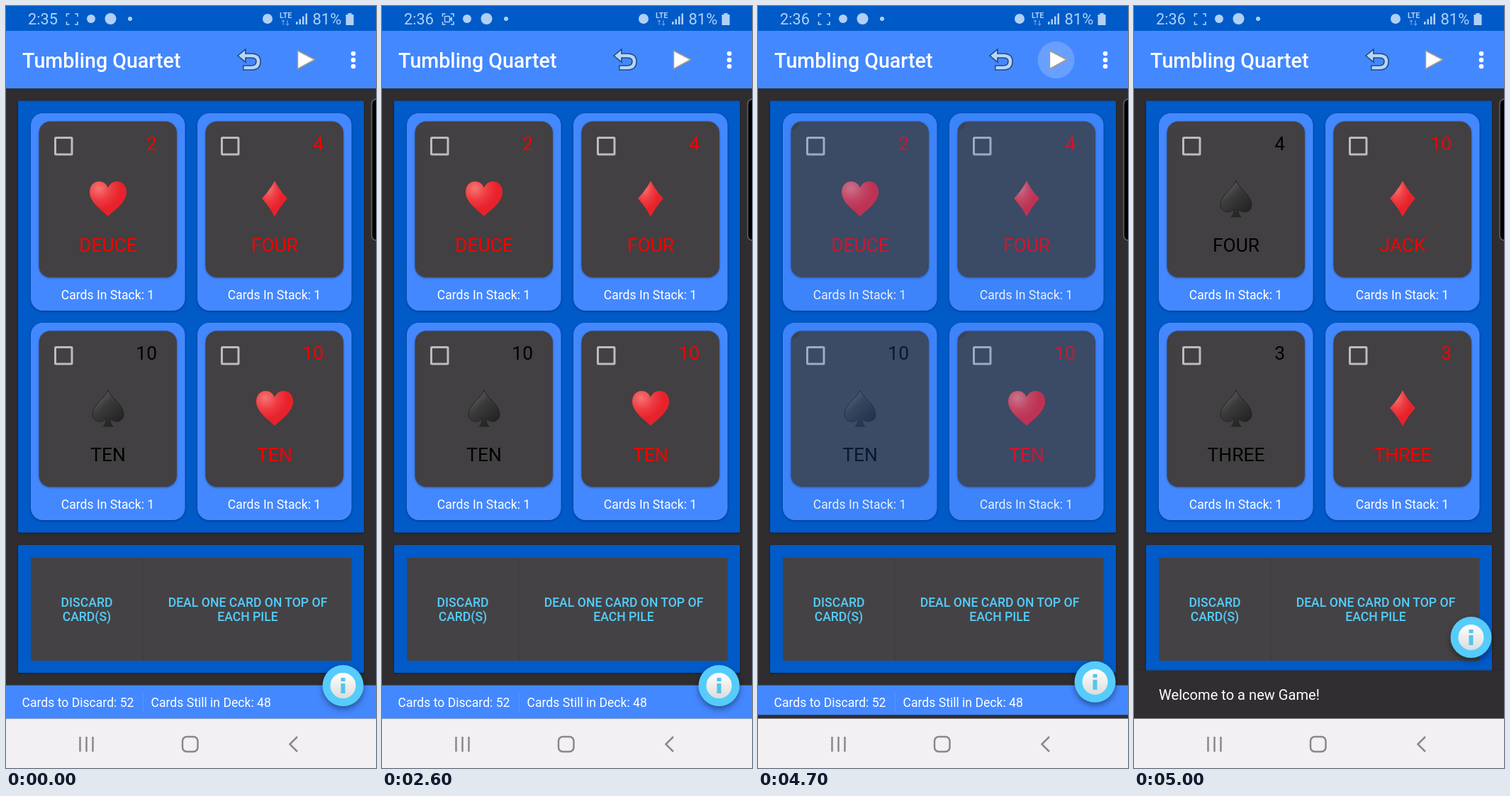
Animation of 522 by 1073 pixels, one loop 5.2 s. Source, as an HTML page:

```html
<!DOCTYPE html>
<html lang="en">
<head>
<meta charset="utf-8">
<title>Card game</title>
<style>
  html, body { margin: 0; width: 100%; height: 100%; overflow: hidden; background: #2f2d2f; }
  svg { display: block; width: 522px; height: 1073px; font-family: Roboto, sans-serif; font-size: 17.6px; }
  .mid { text-anchor: middle; }
  .big { font-size: 26.4px; }
  .shade { filter: drop-shadow(0 1px 1.5px #0006); }
  .button { font-weight: 500; fill: #55ccfb; text-anchor: middle; }
</style>
</head>
<body>
<svg viewBox="0 0 522 1073">
  <defs>
    <radialGradient id="red" cx=".25" cy=".2" r=".6">
      <stop offset="0" stop-color="#f77474"/><stop offset=".55" stop-color="#ee3c42"/><stop offset="1" stop-color="#e8222b"/>
    </radialGradient>
    <linearGradient id="black" x2=".8" y2="1">
      <stop offset="0" stop-color="#747474"/><stop offset=".45" stop-color="#3b3b3b"/><stop offset="1" stop-color="#202020"/>
    </linearGradient>
    <linearGradient id="pearl" x2="0" y2="1">
      <stop offset="0" stop-color="#fff"/><stop offset="1" stop-color="#dcdcdc"/>
    </linearGradient>
    <path id="heart" fill="url(#red)" d="M0 25C-7 18-26 6-26-9C-26-19-19-24-13-24C-6-24-2-20 0-15C2-20 6-24 13-24C19-24 26-19 26-9C26 6 7 18 0 25Z"/>
    <path id="diamond" fill="url(#red)" d="M0-25Q7-11 18 0Q7 12 0 26Q-7 12-18 0Q-7-11 0-25Z"/>
    <path id="spade" fill="url(#black)" stroke="#222" d="M0-25C3-15 22-5 22 9C22 20 9 22 3 15Q3 23 7 26H-7Q-3 23-3 15C-9 22-22 20-22 9C-22-5-3-15 0-25Z"/>
    <clipPath id="reveal"><circle id="hole" cx="11" cy="11" r="0"/></clipPath>
  </defs>

  <rect width="522" height="1073" fill="#2f2d2f"/>

  <!-- status bar -->
  <rect width="522" height="35" fill="#005ac8"/>
  <g fill="#b0d0f6">
    <text id="clock" x="31" y="25.7" font-size="21.7"></text>
    <path d="M89.500 11H85.500V15M97 11H101V15M85.500 22V26H89.500M101 22V26H97" fill="none" stroke="#b0d0f6" stroke-width="1.600"/>
    <g id="camera"><rect x="88.500" y="14.500" width="7" height="8" rx="1" fill="none" stroke="#b0d0f6" stroke-width="1.500"/><path d="M95 18.500L99 15V22Z"/></g>
    <circle cx="120" cy="18" r="6"/>
    <circle cx="147.500" cy="18" r="8"/>
    <circle cx="175" cy="18" r="3"/>
    <circle cx="369" cy="18" r="7"/>
    <text x="386" y="16.500" font-size="10.500" font-weight="700">LTE</text>
    <path d="M391 27V20M389 22L391 20L393 22M397 20V27M395 25L397 27L399 25" fill="none" stroke="#5d98df" stroke-width="1.400"/>
    <path d="M409 22h2.500v4h-2.500zM413.500 18.500h2.500v7.500h-2.500zM418 14.500h2.500v11.500h-2.500zM422.500 10.500h2.500v15.500h-2.500z"/>
    <text x="432.500" y="25.700" font-size="22">81%</text>
    <path d="M482.500 10h5v2h3v15h-11v-15h3z"/>
  </g>

  <!-- app bar -->
  <rect y="35" width="522" height="81" fill="#4488ff"/>
  <text x="23" y="86.500" font-size="28.600" font-weight="500" fill="#fff">Tumbling Quartet</text>
  <g fill="none">
    <path d="M335 70H346Q356 70 356 78Q356 87 346 87H334" stroke="#24477f" stroke-width="7.500"/>
    <path d="M327 70L338 61V79Z" fill="#b5d7f8" stroke="#24477f" stroke-width="1.600"/>
    <path d="M334.500 70H346Q356 70 356 78Q356 87 346 87H335.500" stroke="#b5d7f8" stroke-width="4.500"/>
  </g>
  <circle id="ripple" cx="420.500" cy="76" r="26" fill="#fff"/>
  <path d="M411.500 63L435.500 75.500L411.500 88.500Z" fill="#fff" stroke="#a39a8c" stroke-width="1.500" stroke-linejoin="round"/>
  <g fill="#fff"><circle cx="490" cy="67" r="3.300"/><circle cx="490" cy="76" r="3.300"/><circle cx="490" cy="85" r="3.300"/></g>

  <path d="M523 131Q516 131 516 139V322Q516 330 523 330" fill="#000" stroke="#777577" stroke-width="1.200"/>

  <rect class="shade" x="17" y="133.500" width="488" height="608" rx="2" fill="#005ac8"/>
  <g id="stacks"></g>

  <rect class="shade" x="17" y="759" width="488" height="180" rx="2" fill="#005ac8"/>
  <rect x="35" y="777" width="452.500" height="145" fill="#444244"/>
  <path d="M193.500 777V922" stroke="#3d3b3d"/>
  <g class="button">
    <text x="114" y="846.200">DISCARD</text><text x="114" y="866.400">CARD(S)</text>
    <text x="341" y="846.200">DEAL ONE CARD ON TOP OF</text><text x="341" y="866.400">EACH PILE</text>
  </g>

  <!-- footer and message -->
  <rect y="956.500" width="522" height="47" fill="#4488ff"/>
  <path d="M193.500 967V994" stroke="#5b94f5"/>
  <g fill="#fff"><text x="22.500" y="987.300">Cards to Discard: 52</text><text x="204.500" y="987.300">Cards Still in Deck: 48</text></g>
  <g id="message">
    <rect class="shade" y="935.500" width="522" height="70" fill="#302e30"/>
    <text id="welcome" x="35" y="977.300" font-size="20.100" fill="#fff">Welcome to a new Game!</text>
  </g>
  <g id="info">
    <circle cx="475.500" cy="957" r="29" fill="#55ccfb" style="filter:drop-shadow(0 4px 4px #0006)"/>
    <circle cx="475.500" cy="957" r="18" fill="url(#pearl)"/>
    <path d="M472.500 946h6v5h-6zM472.500 954h6v14h-6z" fill="#55c4ee"/>
  </g>

  <!-- navigation bar -->
  <rect y="1003.500" width="522" height="70" fill="#f2f0f2"/>
  <g fill="none" stroke="#8a888b" stroke-width="2.500">
    <path d="M104.500 1029V1050M113.500 1029V1050M122.500 1029V1050M411 1029L400.500 1039.500L411 1050"/>
    <rect x="249" y="1029" width="21.500" height="21" rx="6"/>
  </g>
</svg>
<script>
const LOOP = 5200, STEP = 100, DEAL = 4660;
const $ = id => document.getElementById(id);
const clamp = x => Math.min(1, Math.max(0, x));

// suit, value, name
const oldCards = [['heart', 2, 'DEUCE'], ['diamond', 4, 'FOUR'], ['spade', 10, 'TEN'], ['heart', 10, 'TEN']];
const newCards = [['spade', 4, 'FOUR'], ['diamond', 10, 'JACK'], ['spade', 3, 'THREE'], ['diamond', 3, 'THREE']];

function card([suit, value, name]) {
  const ink = suit === 'spade' ? '#000' : '#f80000';
  return `<rect class="shade" x="11.500" y="11.500" width="194.500" height="219.500" rx="16" fill="#424042"/>
    <rect x="34.500" y="34.500" width="23.500" height="23.500" rx="1" fill="none" stroke="#bdbbbd" stroke-width="3"/>
    <g class="big" fill="${ink}"><text x="178" y="51.800" text-anchor="end">${value}</text>
    <text class="mid" x="109" y="195">${name}</text></g>
    <use href="#${suit}" x="109" y="120"/>`;
}

$('stacks').innerHTML = oldCards.map((old, i) =>
  `<g transform="translate(${35 + i % 2 * 235} ${151 + (i >> 1) * 295})">
    <rect class="shade" width="217.500" height="278" rx="17" fill="#4488ff"/>
    <text class="mid" x="108.500" y="261.600" fill="#fff">Cards In Stack: 1</text>
    <g class="old">${card(old)}</g>
    <g clip-path="url(#reveal)">${card(newCards[i])}</g>
  </g>`).join('');
const fading = document.querySelectorAll('.old');

const blinks = [100, 600, 1100, 1700, 2200, 2700, 3200, 3700, 4200, 4700];

// Cubic Bezier (.4, 0, .2, 1), solved by bisection
function glide(x) {
  let lo = 0, hi = 1;
  for (let i = 0; i < 20; i++) {
    const s = (lo + hi) / 2, r = 1 - s;
    if (1.2 * r * r * s + 0.6 * r * s * s + s ** 3 < x) lo = s; else hi = s;
  }
  return lo * lo * (3 - 2 * lo);
}

function draw(t) {
  $('clock').textContent = t < 1300 ? '2:35' : '2:36';
  $('camera').setAttribute('opacity', blinks.filter(b => b <= t).length % 2);

  const p = clamp((t - DEAL) / 300);
  $('hole').setAttribute('r', 295 * (1 - Math.cos(Math.PI * p)) / 2);
  $('stacks').setAttribute('opacity', 1 - 0.23 * Math.sin(Math.PI * p));
  fading.forEach(g => g.setAttribute('opacity', 1 - p));

  const press = Math.min(clamp((t - 4550) / 100), clamp((5000 - t) / 200));
  $('ripple').setAttribute('opacity', 0.2 * press);

  const rise = 68 * glide(clamp((t - DEAL) / 250));
  $('message').setAttribute('transform', `translate(0 ${68 - rise})`);
  $('message').setAttribute('visibility', t < DEAL ? 'hidden' : 'visible');
  $('welcome').setAttribute('opacity', clamp((t - DEAL - 70) / 180));
  $('info').setAttribute('transform', `translate(0 ${-rise})`);
}

const start = performance.now();
function tick() {
  const t = (performance.now() - start) % LOOP;
  draw(Math.floor(t / STEP) * STEP);
  requestAnimationFrame(tick);
}
tick();
</script>
</body>
</html>
```
